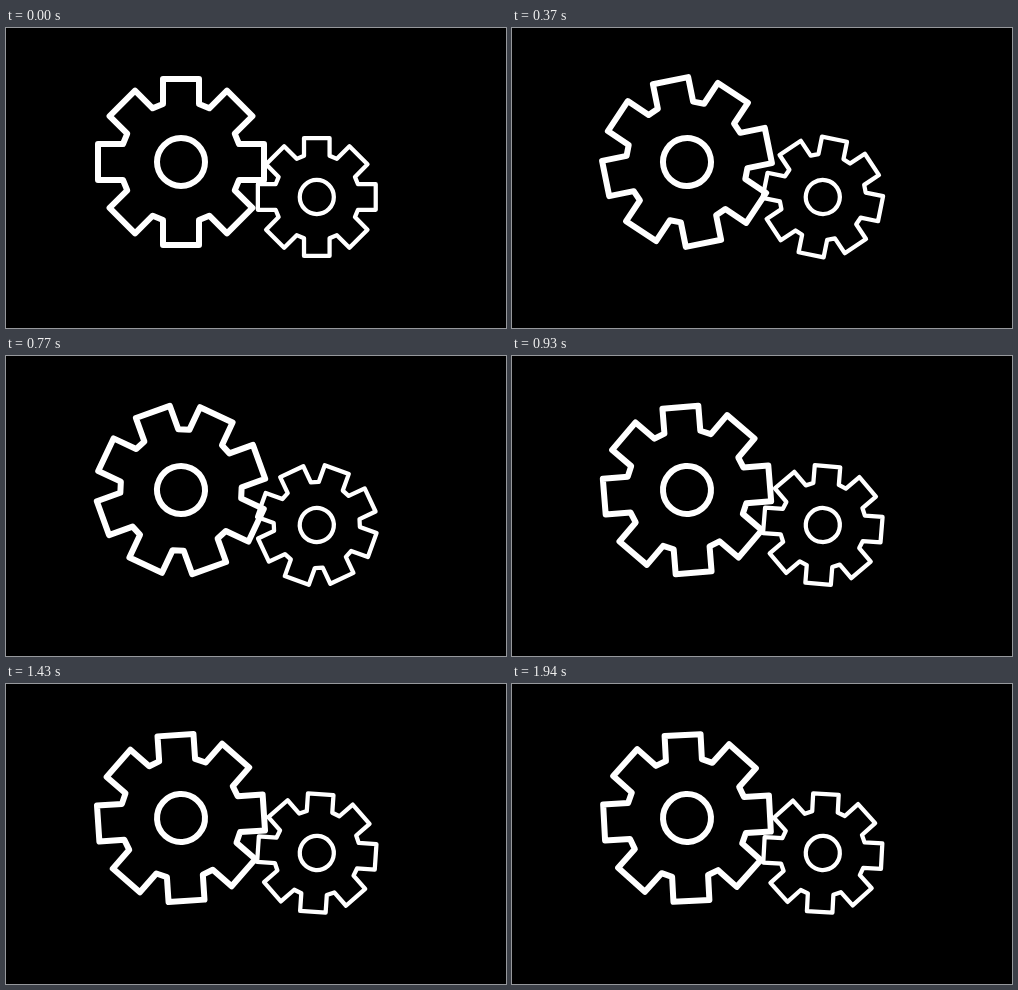
These frames come from a looping animation (500x300 px, 1.98 s). An HTML page:

```html
<!DOCTYPE html>
<html lang="en">
<head>
<meta charset="utf-8">
<title>Gears</title>
<style>
  html, body { margin: 0; width: 100%; height: 100%; overflow: hidden; background: #000; }
  svg { display: block; width: 500px; height: 300px; }
</style>
</head>
<body>
<svg viewBox="0 0 500 300" fill="none" stroke="#fff" stroke-width="6" stroke-linejoin="round">
  <defs>
    <g id="gear">
      <polygon id="teeth"/>
      <circle r="24"/>
    </g>
  </defs>
  <use id="big" href="#gear"/>
  <use id="small" href="#gear"/>
</svg>
<script>
const LOOP = 1980, FRAMES = 59, TEETH = 8;
const $ = id => document.getElementById(id);

// One tooth, repeated around the hub
const tooth = [[-18, -58], [-18, -83], [18, -83], [18, -58]];
const points = [];
for (let i = 0; i < TEETH; i++) {
  const a = i * 2 * Math.PI / TEETH, c = Math.cos(a), s = Math.sin(a);
  for (const [x, y] of tooth) points.push([x * c - y * s, x * s + y * c]);
}
$('teeth').setAttribute('points', points.join(' '));

function place(id, x, y, scale, angle) {
  $(id).setAttribute('transform', `translate(${x} ${y}) scale(${scale}) rotate(${angle})`);
}

// Half a turn per loop, in even steps
function draw(now) {
  const step = Math.min(FRAMES - 1, Math.floor(now % LOOP / 33.4 + 0.2));
  const angle = step * 180 / FRAMES;
  place('big', 175, 134, 1, angle);
  place('small', 310.8, 169, 0.71, -angle);
}

let start;
function tick(now) {
  start ??= now;
  draw(now - start);
  requestAnimationFrame(tick);
}
draw(0);
requestAnimationFrame(tick);
</script>
</body>
</html>
```
